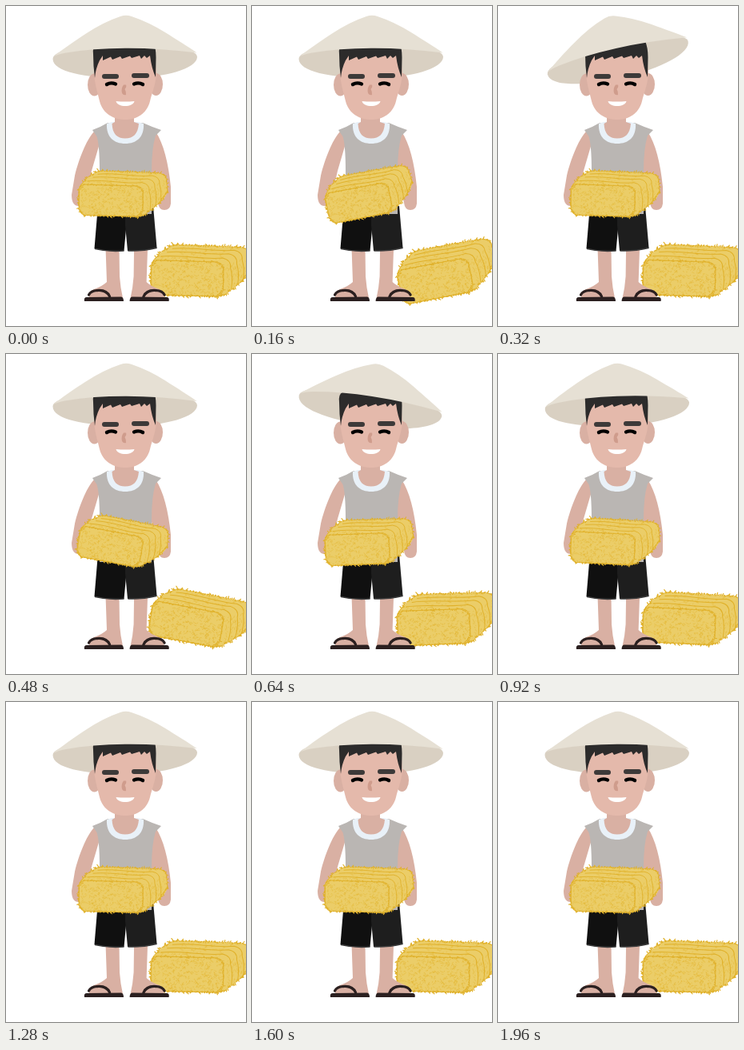
These frames come from a looping animation (300 px wide and 400 px high, 2000 ms). An HTML page with a canvas:

```html
<!DOCTYPE html>
<html lang="en">
<head>
<meta charset="utf-8">
<title>Farmer with hay bales</title>
<style>
html, body { margin: 0; width: 100%; height: 100%; overflow: hidden; background: #fff; }
canvas { display: block; width: 300px; height: 400px; }
</style>
</head>
<body>
<canvas id="stage"></canvas>
<script>
const LOOP = 2000, HAT_DELAY = 160;
const W = 300, H = 400;
const SKIN = '#d9b0a3', FACE = '#e4b9ab', SOLE = '#2b2020', HAIR = '#2c2b2b', BROW = '#3d3a39';
const STRAW = '#ebcd68', STRAW_DARK = '#e0b12a';

const canvas = document.getElementById('stage');
const ctx = canvas.getContext('2d');
const dpr = window.devicePixelRatio || 1;
canvas.width = W * dpr;
canvas.height = H * dpr;

function fill(d, color) {
  ctx.fillStyle = color;
  ctx.fill(d instanceof Path2D ? d : new Path2D(d));
}

function line(d, color, width) {
  ctx.strokeStyle = color;
  ctx.lineWidth = width;
  ctx.lineCap = ctx.lineJoin = 'round';
  ctx.stroke(d instanceof Path2D ? d : new Path2D(d));
}

function ellipse(x, y, rx, ry, color) {
  ctx.fillStyle = color;
  ctx.beginPath();
  ctx.ellipse(x, y, rx, ry, 0, 0, Math.PI * 2);
  ctx.fill();
}

function turned(x, y, deg, draw) {
  ctx.save();
  ctx.translate(x, y);
  ctx.rotate(deg * Math.PI / 180);
  ctx.translate(-x, -y);
  draw();
  ctx.restore();
}

// Tilt one way, return, then ring out as a damped wave.
function swing(t) {
  const half = 160, tilt = 12.5;
  if (t < 0) return 0;
  if (t < 2 * half) return -tilt * (1 - Math.abs(t / half - 1));
  const s = (t - 2 * half) / 1000;
  return 21 * Math.exp(-4.6 * s) * Math.sin(4 * Math.PI * s);
}

function seeded(seed) {
  return () => (seed = (seed * 16807) % 2147483647) / 2147483647;
}

// Hay bale
const outline = new Path2D('M93 224 Q100 214 116 206 Q156 207 193 209 Q200 210 201 218 L202 231 Q201 239 191 247 L173 261 Q169 264 160 263.5 L98 261.5 Q91 260 91 252 L91 232 Q91 226 93 224Z');
const front = new Path2D('M98 223 L163 225 Q171 226 171.5 233 L171 255 Q170 263 162 263 L98 261.5 Q92 260 91.5 253 L91.5 230 Q92 224 98 223Z');
const scribble = new Path2D(), fringe = new Path2D(), rim = new Path2D(), bands = new Path2D();

function buildBale() {
  const rnd = seeded(4711);
  const spread = n => (rnd() - 0.5) * n;

  for (let i = 0; i < 330; i++) {
    const x = 93 + rnd() * 77, y = 226 + rnd() * 35;
    scribble.moveTo(x, y);
    scribble.quadraticCurveTo(x + spread(5), y + spread(5), x + spread(5), y + spread(4));
  }
  for (let i = 0; i < 80; i++) {
    const u = rnd(), x = 97 + rnd() * 72 + u * 26, y = 222 - u * 14;
    scribble.moveTo(x, y);
    scribble.lineTo(x + spread(5), y + spread(2));
  }
  for (let i = 0; i < 60; i++) {
    const u = rnd(), x = 173 + u * 27, y = 229 - u * 13 + rnd() * 28;
    scribble.moveTo(x, y);
    scribble.lineTo(x + spread(2), y + spread(5));
  }

  function tufts(path, points, outer, inner) {
    for (let i = 1; i < points.length; i++) {
      const [x0, y0] = points[i - 1], [x1, y1] = points[i];
      const dx = x1 - x0, dy = y1 - y0, len = Math.hypot(dx, dy);
      for (let s = 0; s < len; s += 1.5) {
        const x = x0 + dx * s / len, y = y0 + dy * s / len;
        const out = rnd() * (outer + inner) - inner, lean = spread(5);
        path.moveTo(x, y);
        path.lineTo(x + (dy * out + dx * lean) / len, y + (-dx * out + dy * lean) / len);
      }
    }
  }
  tufts(fringe, [[92, 226], [102, 214], [116, 206], [156, 207], [193, 209], [200, 213],
    [202, 231], [191, 247], [173, 261], [163, 263], [98, 261.5], [91, 254], [91, 228]], 2.6, 1.4);
  tufts(rim, [[92, 229], [98, 223], [163, 225], [171, 231], [171, 256], [163, 263]], 1.5, 1.5);

  for (const s of [8, 15, 21]) {
    const x = 94 + s, y = 224 - s * 0.66;
    bands.moveTo(x, y);
    bands.bezierCurveTo(x + 24, y - 2, x + 46, y + 4, x + 68, y + 2);
    bands.quadraticCurveTo(x + 78, y + 4, x + 77, y + 13);
    bands.quadraticCurveTo(x + 80, y + 22, x + 78, y + 36);
  }
}
buildBale();

function bale(angle) {
  turned(146, 234, angle, () => {
    fill(outline, STRAW);
    line(fringe, STRAW_DARK, 1.1);
    ctx.save();
    ctx.clip(outline);
    line(bands, STRAW_DARK, 0.9);
    ctx.globalAlpha = 0.5;
    line(scribble, STRAW_DARK, 0.7);
    ctx.restore();
    line(front, STRAW_DARK, 0.7);
    line(rim, STRAW_DARK, 0.9);
  });
}

function bigBale(angle) {
  ctx.save();
  ctx.translate(180, 364);
  ctx.scale(1.13, 1.13);
  ctx.translate(-90, -264);
  bale(angle);
  ctx.restore();
}

// Figure
function leg() {
  fill('M124.5 302 L126 345 Q121 350 110 354 Q103 357 104 365 L146 365 Q143 352 142 338 L141.5 302Z', SKIN);
  line('M103.5 361 Q106 356 114 355.5 Q126 354.5 129.5 363', SOLE, 3.2);
  line('M114 356 Q123 354 130 363.5', SOLE, 2.4);
  fill('M98 369 Q97 364 101 364 L144 363.5 Q147 364 147 369Z', SOLE);
}

function mirrored(axis, draw) {
  ctx.save();
  ctx.translate(2 * axis, 0);
  ctx.scale(-1, 1);
  draw();
  ctx.restore();
}

function body() {
  leg();
  mirrored(150.8, leg);
  fill('M114.5 255 L110.5 303 Q128 308 147.5 306 L150.5 274 L150 255Z', '#101010');
  fill('M149 255 L149 274 L152 306 Q173 307 188.5 302 L184 250Z', '#1e1e1e');
  line('M111.5 303.5 Q128 307.5 147 306', '#3a3a3a', 1.6);
  line('M153 306 Q172 306.5 188 302.5', '#3a3a3a', 1.6);

  fill('M110 157 C100 168 91 192 86 212 L82 236 Q82 250 91 250 L98 246 L107 206 L117 172 L117 160Z', SKIN);
  fill('M187 157 C197 172 203 196 206 226 L206 247 Q205 255 198 255 Q191 255 190 246 L182 210 L182 165Z', SKIN);
  fill('M127 146 Q119 151 108 155 L113.5 163 Q117 174 117 207 L117 260 L182 260 L182 207 Q182 178 187 162 L194 155 Q182 151 171 146Z', '#bab6b3');
  fill('M126 147 C125 164 135 172 149 172 C163 172 173 164 172 147 L165 145 L132 145Z', '#e9f1f8');
  fill('M136 134 L136 145 L132.5 147 C133 160 139 165.5 149 165.5 C159 165.5 165 160 166 147 L160 145 L160 134Z', SKIN);
}

function head() {
  ellipse(110.5, 98.5, 8.5, 14, SKIN);
  ellipse(187.5, 98, 8.5, 14, SKIN);
  fill('M110 58 L110 86 C112 102 115 110 117 119 C121 135 135 142 149 142 C163 142 176 135 180 119 C182 110 186 102 188 86 L186 56Z', FACE);
  fill('M109 60 Q108 50 113 48 L116 44 L184 44 Q187.5 52 187.5 64 L187 89 Q182 78 180 62 L176 65 L173 62 L169 66 L167 62 L157 65 L155 62.5 L145 66 L143 63 L133 67 L131 63.5 L121 68 L121 62 L117 68 Q112 78 111 90 L109.5 75Z', HAIR);

  line('M123 88 L138 88', BROW, 6);
  line('M160 87 L176 87', BROW, 6);
  line('M126 98 Q131 95 137 97.5', '#000', 4.4);
  line('M160 97.5 Q166 95 171 98', '#000', 4.4);
  fill('M147 98.5 Q143.5 103 145 109 Q147 112 150 111 Q150.5 107 148.5 104 Q151 101 150 98.5Z', '#cf9c8c');
  fill('M137.5 119 Q149 120 160.5 119 C158.5 127 139.5 127 137.5 119Z', '#fff');
}

function brim() {
  fill('M58.5 66 C59 54 100 49 149 49 C198 49 238 52 239 63.5 C239 78 200 90 149 90 C98 90 58.5 82 58.5 66Z', '#d9d0c2');
}

function cone() {
  fill('M59 63.5 C67 57 85 44 100 34.5 Q122 20 143 13 Q150 10.5 157 13 Q178 20 199 33 C213 42 228 51 238.5 58.5 Q190 52.5 149 52.8 Q108 53 75 58.5 Q64 60.5 59 63.5Z', '#e6e0d4');
}

function draw(t) {
  const hay = swing(t), hat = swing(t - HAT_DELAY);
  ctx.setTransform(dpr, 0, 0, dpr, 0, 0);
  ctx.fillStyle = '#fff';
  ctx.fillRect(0, 0, W, H);
  turned(149, 60, hat, brim);
  bigBale(hay);
  body();
  head();
  turned(149, 60, hat, cone);
  bale(hay);
}

const start = performance.now();
function tick() {
  draw((performance.now() - start) % LOOP);
  requestAnimationFrame(tick);
}
tick();
</script>
</body>
</html>
```
